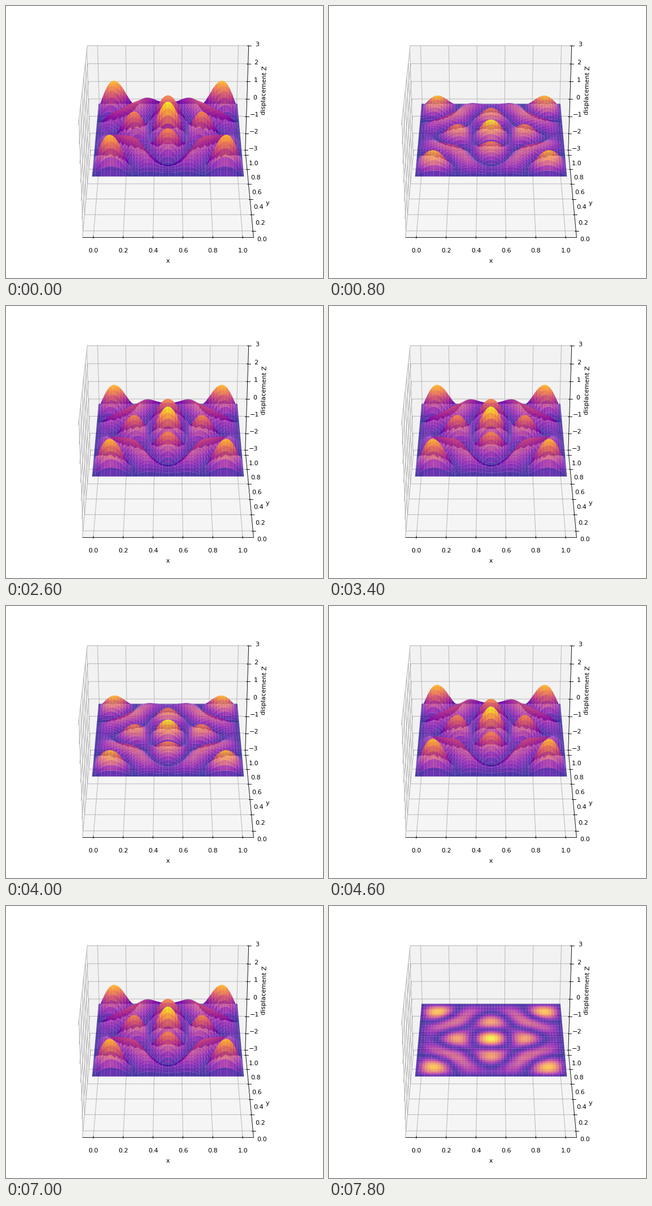
Animation of 560x480 px, one loop 8 s. Source, as a matplotlib script:

```python
import numpy as np
import matplotlib.pyplot as plt
from matplotlib.animation import FuncAnimation

FRAMES, STEP = 40, 200
PERIOD = 6          # frames between two crests
N = 100

fig = plt.figure(figsize=(7, 6), dpi=80)
ax = fig.add_axes([0.025, 0.025, 0.95, 0.95], projection="3d")
ax.view_init(elev=30, azim=-90)

x, y = np.meshgrid(np.linspace(0, 1, N), np.linspace(0, 1, N))


def mode(m, n):
    return np.sin(m * np.pi * x) * np.sin(n * np.pi * y)


plate = mode(3, 5) + mode(5, 3)


def surface(k):
    # colours rescale to each height, so the flat plate keeps its pattern
    z = np.abs(plate * np.cos(np.pi * k / PERIOD))
    return ax.plot_surface(x, y, z, cmap="plasma", alpha=0.8, visible=False)


surfaces = [surface(k) for k in range(PERIOD)]

margin = 0.05 + 1.1 / 48
ax.set_xlim(-margin, 1 + margin)
ax.set_ylim(-margin, 1 + margin)
ax.set_zlim(-3, 3)
ax.set_xlabel("x")
ax.set_ylabel("y")
ax.set_zlabel("displacement Z")


def update(i):
    for k, s in enumerate(surfaces):
        s.set_visible(k == i % PERIOD)
    return surfaces


anim = FuncAnimation(fig, update, frames=FRAMES, interval=STEP,
                     repeat=True, repeat_delay=0, blit=False)
plt.show()
```
